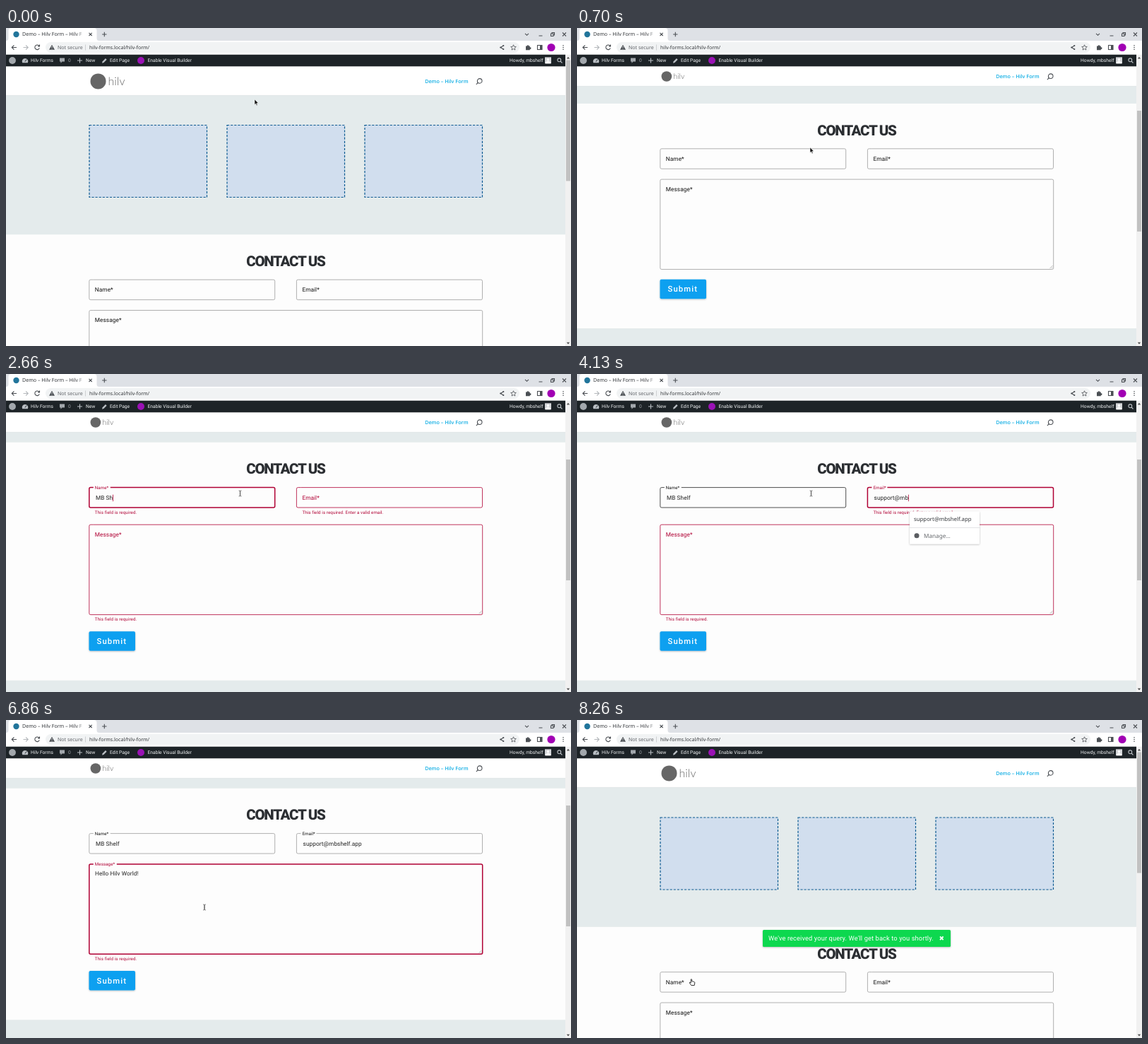
An HTML page that plays this animation: 800 px wide and 450 px high, repeating every 8.33 s.

```html
<!DOCTYPE html>
<html lang="en">
<head>
<meta charset="utf-8">
<title>Contact form demo</title>
<style>
  html, body { margin: 0; width: 100%; height: 100%; overflow: hidden; background: #fdfdfd; }
  svg { display: block; width: 800px; height: 450px; }
  text { white-space: pre; font-family: Roboto, sans-serif; text-rendering: geometricPrecision; }
  .ui { font: 7px "Noto Sans", sans-serif; fill: #33363a; }
  .bar { font-size: 6.7px; fill: #eef0f1; }
  .input { font-size: 8.25px; letter-spacing: .077px; }
  .help { font-size: 6.19px; letter-spacing: .1px; fill: #b00034; }
  .icon { fill: none; stroke: #4b4f54; stroke-width: 1.1; }
  .light { fill: none; stroke: #b9bec3; stroke-width: 1.1; }
</style>
</head>
<body>
<svg viewBox="0 0 800 450">
  <defs>
    <linearGradient id="fade">
      <stop offset="0" stop-color="#fff" stop-opacity="0"/><stop offset="1" stop-color="#fff"/>
    </linearGradient>
    <filter id="shadow" x="-10%" y="-20%" width="120%" height="150%">
      <feDropShadow dx="0" dy=".8" stdDeviation=".8" flood-opacity=".28"/>
    </filter>
  </defs>
  <rect width="800" height="450" fill="#fdfdfd"/>

  <g id="page">
    <rect width="792" height="292.3" fill="#e4ebec"/>
    <g id="boxes" fill="#d1deee" stroke="#0c5a92" stroke-width="1.2" stroke-dasharray="3.2 1.9"></g>
    <text x="396" y="337" text-anchor="middle" fill="#2b2e32"
      font-size="20.5" font-weight="800" letter-spacing="-1.3">CONTACT US</text>
    <g id="fields"></g>
    <g id="submit">
      <rect x="117.5" y="541" width="65.5" height="27.5" rx="2" fill="#0ca0f0" filter="url(#shadow)"/>
      <text x="128.5" y="558.8" fill="#fff" font-size="11.3" font-weight="500" letter-spacing="1.1">Submit</text>
    </g>
    <rect id="footer" width="792" height="200" fill="#e4ebec"/>
    <g id="toast">
      <rect x="263" y="296.5" width="266" height="24" rx="1.5" fill="#10d850" filter="url(#shadow)"/>
      <text x="271" y="311.7" fill="#fff" font-size="9.28" letter-spacing=".12">We've received your query. We'll get back to you shortly.</text>
      <path d="M514 306l4.6 4.6M518.6 306l-4.6 4.6" stroke="#fff" stroke-width="1.8"/>
    </g>
  </g>

  <g id="popup">
    <rect x="471" y="194.5" width="99" height="46" rx="1" fill="#fff" filter="url(#shadow)"/>
    <path d="M471 217.5h99" stroke="#e3e4e6"/>
    <text class="ui" x="477" y="208.3" style="font-size: 7.8px">support@mbshelf.app</text>
    <circle cx="481" cy="228.7" r="3.5" fill="#5a5d61"/>
    <text class="ui" x="491" y="231.6" style="font-size: 8.2px; fill: #66696d">Manage…</text>
  </g>

  <rect id="headerBack" y="54" width="792" fill="#fff"/>
  <path id="headerLine" stroke="#000" stroke-opacity=".05" d="M0 0h792"/>
  <g id="logo">
    <circle cx="11" cy="0" r="11" fill="#666"/>
    <text x="25" y="5.7" fill="#666" style="font: 300 16px Lato, sans-serif">hilv</text>
  </g>
  <g id="nav">
    <text x="654.5" y="2.5" text-anchor="end" fill="#10aee4" style="font: 600 7.2px 'Open Sans', sans-serif">Demo – Hilv Form</text>
    <path d="M668.3 2.3l-2.5 2.5" class="icon"/>
    <circle cx="670.7" cy="-.1" r="3.3" class="icon"/>
  </g>

  <rect width="800" height="18" fill="#dee1e6"/>
  <path d="M0 18q3.5 0 3.5-3.5V4q0-4 4-4h117q4 0 4 4v10.5q0 3.5 3.5 3.5z" fill="#fff"/>
  <circle cx="14.5" cy="9" r="4.2" fill="#21759b"/>
  <text class="ui" x="23" y="11.4" style="font-size: 7.1px">Demo – Hilv Form – Hilv F</text>
  <rect x="99" y="3" width="14" height="12" fill="url(#fade)"/>
  <path class="icon" d="M117.5 6.8l4.2 4.2m0-4.2l-4.2 4.2M139.3 5.8v6.4m-3.2-3.2h6.4M735 7.8l2.5 2.5 2.5-2.5M754.5 11h5M788 6.5l5 5m0-5l-5 5M771.5 8h3.5v3.5h-3.5zM773 8V6.5h3.5V10H775"/>

  <rect y="18" width="800" height="20" fill="#fff"/>
  <rect x="56" y="20" width="671" height="15" rx="7.5" fill="#f1f3f4"/>
  <g class="icon">
    <path d="M15 27.5H8.2m3.2-3.2l-3.2 3.2 3.2 3.2M47 25.6a3.3 3.3 0 1 0 .3 2.7M47.5 23.5v2.5h-2.5"/>
    <path d="M24.5 27.5h6.8m-3.2-3.2l3.2 3.2-3.2 3.2" stroke="#b5b8bc"/>
    <path d="M704.3 25l-4 2.5 4 2.5"/>
    <path d="M718.5 23.8l1.1 2.5 2.7.2-2 1.8.6 2.7-2.4-1.4-2.4 1.4.6-2.7-2-1.8 2.7-.2z" stroke-width=".8"/>
    <rect x="752.5" y="24.5" width="6.5" height="6"/>
  </g>
  <g fill="#4b4f54">
    <circle cx="704.3" cy="25" r="1.1"/><circle cx="700.3" cy="27.5" r="1.1"/><circle cx="704.3" cy="30" r="1.1"/>
    <path d="M65 23.7l4 7h-8z"/>
    <path d="M736 25.5h1.8a1.2 1.2 0 1 1 2.4 0h1.6v2a1.2 1.2 0 1 1 0 2.2v1.5H736z"/>
    <rect x="756" y="24.5" width="3" height="6"/>
    <circle cx="789" cy="24.7" r=".8"/><circle cx="789" cy="27.5" r=".8"/><circle cx="789" cy="30.3" r=".8"/>
  </g>
  <path d="M65 26v2m0 1v.8" stroke="#fff" stroke-width=".8"/>
  <text class="ui" x="73" y="30" style="fill: #606368">Not secure</text>
  <path d="M112.5 23.5v8" stroke="#c4c7ca" stroke-width=".8"/>
  <text class="ui" x="118" y="30">hilv-forms.local/hilv-form/</text>
  <circle cx="772" cy="27.5" r="5.6" fill="#a100b4"/>

  <rect y="37.7" width="792" height="16.6" fill="#1d2327"/>
  <circle cx="9" cy="46" r="4.9" fill="#a3a8ad"/>
  <path d="M23.2 49.3a4.3 4.3 0 1 1 7.6 0z" fill="#b9bec3"/>
  <path d="M27 47.5l2-3" stroke="#1d2327" stroke-width=".9"/>
  <path d="M76 42.5h7v5h-3.5l-2 2.3v-2.3H76z" fill="#a3a8ad"/>
  <path class="light" d="M104.5 42.5v7m-3.5-3.5h7"/>
  <path d="M136 49.7l.7-2.5 4.2-4.2 1.7 1.7-4.2 4.2z" fill="#b9bec3"/>
  <circle cx="191" cy="46" r="5" fill="#9a12b5"/>
  <text class="bar" x="35" y="48.3">Hilv Forms</text>
  <text class="bar" x="88" y="48.3" style="fill: #9ca1a6">0</text>
  <text class="bar" x="113" y="48.3">New</text>
  <text class="bar" x="147" y="48.3">Edit Page</text>
  <text class="bar" x="200.5" y="48.3">Enable Visual Builder</text>
  <text class="bar" x="760.5" y="48.3" text-anchor="end">Howdy, mbshelf</text>
  <rect x="763" y="41.3" width="9" height="9" fill="#d3d5d8"/>
  <path d="M764 50.3q0-3.5 3.5-3.5t3.5 3.5z" fill="#fff"/><circle cx="767.5" cy="44.7" r="1.8" fill="#fff"/>
  <circle cx="783.3" cy="45.3" r="2.4" class="light"/><path d="M785 47l2.5 2.5" class="light"/>

  <rect x="792" y="37.7" width="8" height="412.3" fill="#f1f1f1"/>
  <path d="M793.8 43.5h4.4l-2.2-2.7zM793.8 444.8h4.4l-2.2 2.7z" fill="#505050"/>
  <rect id="thumb" x="793" width="6" height="171" fill="#c1c1c1"/>

  <g id="pointer">
    <path id="arrow" d="M0 0v7.5l1.7-1.6 1.2 2.8 1.2-.5-1.2-2.7h2.4z" fill="#111" stroke="#fff" stroke-width=".5"/>
    <path id="beam" d="M-1.8-4q1.8 0 1.8 1.3V2.7Q0 4-1.8 4M1.8-4Q0-4 0-2.7V2.7Q0 4 1.8 4" fill="none" stroke="#333" stroke-width=".7"/>
    <path id="hand" d="M-1.7-4q1.1-.9 1.4.4v2.4l3 .6q1.2.4 1.1 1.5L3.2 4.5h-4.4L-3.7 1q-.3-1.2.9-.8l1.1.9z" fill="#fff" stroke="#222" stroke-width=".9"/>
  </g>
</svg>
<script>
const LOOP = 8330, RED = '#b00034', ROW_HELP = 9.3, MESSAGE_HELP = 9.5;
const SUBMIT = 7050, RESET = 7250, SCROLLED = 195.6;
const $ = id => document.getElementById(id);
const clamp = v => Math.max(0, Math.min(1, v));
const ramp = (t, from, to) => clamp((t - from) / (to - from));
const smooth = u => u * u * (3 - 2 * u);
const mix = (a, b, u) => a + (b - a) * u;
const within = (t, spans) => spans.some(([from, to]) => t >= from && t < to);
const show = (node, on) => node.setAttribute('visibility', on ? 'visible' : 'hidden');

function set(node, attrs) {
  for (const key in attrs) node.setAttribute(key, attrs[key]);
}

function add(parent, tag, attrs, text = '') {
  const node = document.createElementNS('http://www.w3.org/2000/svg', tag);
  set(node, attrs);
  node.textContent = text;
  return parent.appendChild(node);
}

for (const x of [118, 313, 508])
  add($('boxes'), 'rect', { x, y: 137.5, width: 166.5, height: 102 });

const fields = [
  { label: 'Name*', x: 117.8, y: 356.2, w: 262.9, h: 28.4, gap: 24, textX: 9.2, textY: 17.6, helpY: 37.4,
    value: 'MB Shelf', typed: 2120, step: 130, help: 'This field is required.',
    focus: [[980, 1230], [1960, 3480]], error: [1230, 3480] },
  { label: 'Email*', x: 411.4, y: 356.2, w: 263.1, h: 28.4, gap: 22, textX: 9.2, textY: 17.6, helpY: 37.4,
    value: 'support@mbshelf.app', typed: 3560, step: 62, help: 'This field is required. Enter a valid email.',
    focus: [[1540, 1960], [3480, 5040]], error: [1960, 5040] },
  { label: 'Message*', x: 117.8, y: 399.5, w: 556.9, h: 127.4, gap: 33, textX: 8.2, textY: 16, helpY: 136.3,
    value: 'Hello Hilv World!', typed: 5530, step: 51, help: 'This field is required.', multiline: true,
    focus: [[1230, 1540], [5040, SUBMIT]], error: [1540, SUBMIT] }
];
for (const f of fields) {
  f.group = add($('fields'), 'g', {});
  f.outline = add(f.group, 'path', { fill: 'none' });
  f.labelNode = add(f.group, 'text', { x: f.x + 8, 'letter-spacing': .077 }, f.label);
  f.text = add(f.group, 'text', { class: 'input', x: f.x + f.textX, y: f.textY, fill: '#222' });
  f.caret = add(f.group, 'path', { 'stroke-width': .8 });
  f.helper = add(f.group, 'text', { class: 'help', x: f.x + 8, y: f.helpY }, f.help);
  if (f.multiline)
    add(f.group, 'path', { d: 'M669.5 126l4-4M672 126l1.5-1.5', stroke: '#888', 'stroke-width': .6 });
  // The label stays raised from the last focus until the form is cleared.
  f.raised = [f.focus[0], [f.focus[1][0], RESET]];
}

const pointerPath = [
  [0, 352, 101], [250, 352, 101], [650, 330, 169], [720, 330, 169], [960, 285, 178], [1010, 285, 178],
  [1210, 330, 250], [1250, 330, 250], [1460, 449, 178], [1600, 449, 178], [1920, 331.5, 169],
  [4700, 331.5, 169], [5000, 281, 265], [6870, 281, 265], [7040, 163, 371], [LOOP, 163, 371]
];

function pointerAt(t) {
  const i = pointerPath.findIndex(p => p[0] > t);
  const [a, b] = [pointerPath[i - 1], pointerPath[i]];
  const u = smooth(ramp(t, a[0], b[0]));
  return [mix(a[1], b[1], u), mix(a[2], b[2], u)];
}

function outlinePath({ x, w, h, gap }, open) {
  const r = 2, start = x + 6, end = start + gap * open;
  return `M${end} 0H${x + w - r}q${r} 0 ${r} ${r}V${h - r}q0 ${r} ${-r} ${r}H${x + r}` +
    `q${-r} 0 ${-r} ${-r}V${r}q0 ${-r} ${r} ${-r}H${start}`;
}

function drawField(f, t, top, scroll, [px, py]) {
  const focused = within(t, f.focus), error = within(t, [f.error]);
  const raised = Math.max(...f.raised.map(([a, b]) => ramp(t, a, a + 140) * (1 - ramp(t, b, b + 140))));
  const screenTop = top - scroll;
  const hover = t < SUBMIT && px > f.x && px < f.x + f.w && py > screenTop && py < screenTop + f.h;
  const color = error ? RED : focused ? '#000' : hover ? '#222' : '#9c9c9c';
  f.group.setAttribute('transform', `translate(0 ${top})`);
  set(f.outline, { d: outlinePath(f, raised), stroke: color, 'stroke-width': focused ? 1.5 : .8 });
  set(f.labelNode, {
    y: mix(f.multiline ? 16.6 : 17.2, 2.2, raised),
    'font-size': mix(8.25, 6.19, raised),
    fill: error ? RED : '#111'
  });

  const count = t < f.typed || t >= RESET ? 0 : Math.floor((t - f.typed) / f.step) + 1;
  f.text.textContent = f.value.slice(0, count);
  const typedEnd = f.typed + f.step * (f.value.length - 1);
  const focusStart = f.focus[t < f.focus[1][0] ? 0 : 1][0];
  const lastKey = t < f.typed ? focusStart : Math.min(t, typedEnd);
  const caretX = f.x + f.textX + .3 + (count ? f.text.getComputedTextLength() : 0);
  set(f.caret, { d: `M${caretX} ${f.textY - 7.5}v9.5`, stroke: error ? RED : '#000' });
  show(f.caret, focused && (t - lastKey) % 1000 < 500);
  show(f.helper, error);
  return hover;
}

function draw(t) {
  const down = 1 - (1 - ramp(t, 300, 820)) ** 2;
  const scroll = SCROLLED * down - (SCROLLED + .5) * smooth(ramp(t, RESET, 7770));
  const compact = smooth(ramp(t, 320, 670)) * (1 - smooth(ramp(t, 7420, 7770)));
  const pointer = pointerAt(t);

  $('page').setAttribute('transform', `translate(0 ${-scroll})`);
  const rowShift = within(t, [[1230, 5040]]) ? ROW_HELP : 0;
  const formShift = rowShift + (within(t, [[1540, SUBMIT]]) ? MESSAGE_HELP : 0);
  const hovered = fields.map(f =>
    drawField(f, t, f.y + (f.multiline ? rowShift : 0), scroll, pointer));
  $('submit').setAttribute('transform', `translate(0 ${formShift})`);
  $('footer').setAttribute('y', 610.4 + formShift);
  $('toast').setAttribute('opacity', ramp(t, RESET, RESET + 200));
  show($('popup'), t >= 3600 && t < 4680);

  const headerEnd = mix(95.3, 82.3, compact);
  $('headerBack').setAttribute('height', headerEnd - 54);
  $('headerLine').setAttribute('transform', `translate(0 ${headerEnd})`);
  $('logo').setAttribute('transform',
    `translate(119.5 ${mix(75.4, 68.5, compact)}) scale(${mix(1, .67, compact)})`);
  $('nav').setAttribute('transform', `translate(0 ${mix(75, 68.3, compact)})`);
  $('thumb').setAttribute('y', 45.5 + Math.max(0, scroll) * .386);

  const kind = t >= SUBMIT - 40 ? 'hand' : hovered.some(Boolean) ? 'beam' : 'arrow';
  for (const id of ['arrow', 'beam', 'hand']) show($(id), id === kind);
  $('pointer').setAttribute('transform', `translate(${pointer})`);
}

const begin = performance.now();
function tick() {
  draw((performance.now() - begin) % LOOP);
  requestAnimationFrame(tick);
}
tick();
</script>
</body>
</html>
```
